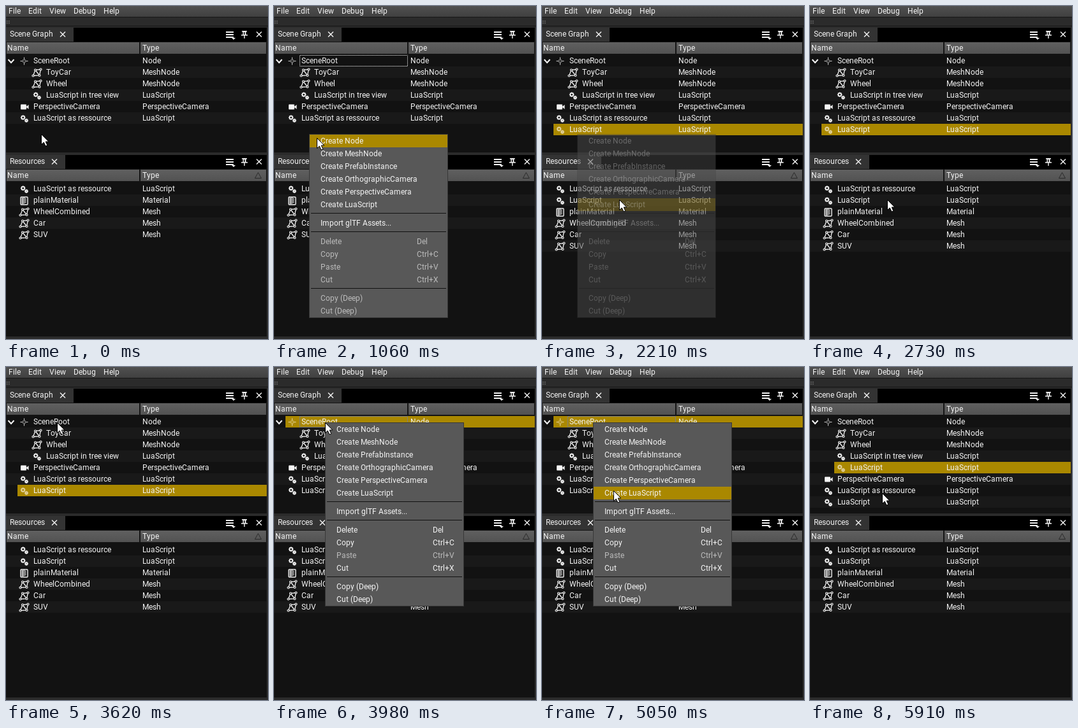
An HTML page with a canvas that plays this animation: 411 px wide and 523 px high, repeating every 6.67 s.

```html
<!DOCTYPE html>
<html lang="en">
<head>
<meta charset="utf-8">
<title>Scene editor</title>
<style>
html, body { margin: 0; width: 100%; height: 100%; overflow: hidden; background: #121212; }
canvas { display: block; }
</style>
</head>
<body>
<canvas id="stage" width="411" height="523"></canvas>
<script>
const ctx = document.getElementById('stage').getContext('2d');
const LOOP = 6670;
const GOLD = '#aa8800';
const WHITE = '#f4f4f4';
const TAN = '#e3d3a0';

function box(x, y, w, h, color) {
  ctx.fillStyle = color;
  ctx.fillRect(x, y, w, h);
}

function shade(x, y, w, h, top, bottom) {
  const g = ctx.createLinearGradient(0, y, 0, y + h);
  g.addColorStop(0, top);
  g.addColorStop(1, bottom);
  box(x, y, w, h, g);
}

// Glyphs sit on whole pixels, as in a hinted desktop interface.
function label(text, x, middle, color = WHITE) {
  ctx.font = '12px Roboto, sans-serif';
  ctx.fillStyle = color;
  for (const glyph of text) {
    ctx.fillText(glyph, x, middle + 4);
    x += Math.round(ctx.measureText(glyph).width);
  }
}

function trace(points, closed) {
  ctx.beginPath();
  points.forEach(([x, y]) => ctx.lineTo(x, y));
  if (closed) ctx.closePath();
}

function line(points, color, width = 1, closed = false) {
  trace(points, closed);
  ctx.strokeStyle = color;
  ctx.lineWidth = width;
  ctx.stroke();
}

function fillShape(points, color) {
  trace(points, true);
  ctx.fillStyle = color;
  ctx.fill();
}

function ring(x, y, r, color, width) {
  ctx.beginPath();
  ctx.arc(x, y, r, 0, Math.PI * 2);
  ctx.strokeStyle = color;
  ctx.lineWidth = width;
  ctx.stroke();
}

function at(x, y, draw) {
  ctx.save();
  ctx.translate(x, y);
  draw();
  ctx.restore();
}

function gear(x, y, r, color) {
  ring(x, y, r, color, 1.7);
  for (let i = 0; i < 8; i++) {
    const c = Math.cos(i * Math.PI / 4), s = Math.sin(i * Math.PI / 4);
    line([[x + c * r, y + s * r], [x + c * (r + 1.6), y + s * (r + 1.6)]], color, 1.3);
  }
}

// Icons are drawn around their own centre.
const icons = {
  node(color) {
    const c = color === WHITE ? '#c4c4c4' : color;
    for (let i = 0; i < 8; i++) {
      const a = i * Math.PI / 4, far = i % 2 ? 3.6 : 6;
      line([[Math.cos(a) * 1.4, Math.sin(a) * 1.4], [Math.cos(a) * far, Math.sin(a) * far]], c, i % 2 ? 0.8 : 1.1);
    }
  },
  mesh(color) {
    const dots = [[-6, 5], [-2.5, -4], [6, -5], [4, 4.5]];
    line(dots, color, 1.3, true);
    line([dots[1], dots[3]], color, 1.3);
    for (const [x, y] of dots) {
      ctx.beginPath();
      ctx.arc(x, y, 1.5, 0, Math.PI * 2);
      ctx.fillStyle = '#161616';
      ctx.fill();
      ring(x, y, 1.5, color, 1.2);
    }
  },
  script(color) {
    gear(-1.8, -1.3, 2.3, color);
    gear(3.5, 3.3, 1.5, color);
  },
  camera(color) {
    ctx.beginPath();
    ctx.roundRect(-5.5, -4, 9, 8, 1);
    ctx.fillStyle = color;
    ctx.fill();
    fillShape([[3, 0], [7, -3.5], [7, 3.5]], color);
  },
  material(color) {
    ctx.beginPath();
    ctx.roundRect(-5.5, -5.5, 11, 12, 1);
    ctx.strokeStyle = color;
    ctx.lineWidth = 1.4;
    ctx.stroke();
    box(-4, -5, 3, 11, '#b8b8b8');
    for (let i = 0; i < 9; i++) box(-1 + (i % 2) * 2, -4.5 + i, 2, 1, color);
  }
};

const row = (name, type, icon, level = 0) => ({ name, type, icon, level });
const shared = row('LuaScript as ressource', 'LuaScript', 'script');
const fresh = row('LuaScript', 'LuaScript', 'script');
const child = row('LuaScript', 'LuaScript', 'script', 1);
const root = row('SceneRoot', 'Node', 'node');
const branch = [
  root,
  row('ToyCar', 'MeshNode', 'mesh', 1),
  row('Wheel', 'MeshNode', 'mesh', 1),
  row('LuaScript in tree view', 'LuaScript', 'script', 1)
];
const camera = row('PerspectiveCamera', 'PerspectiveCamera', 'camera');
const assets = [
  row('plainMaterial', 'Material', 'material'),
  ...['WheelCombined', 'Car', 'SUV'].map(n => row(n, 'Mesh', 'mesh'))
];

function focusFrame(y, color) {
  ctx.setLineDash([1, 1]);
  ctx.lineDashOffset = -0.5;
  line([[40.5, y + 0.5], [209.5, y + 0.5], [209.5, y + 17.5], [40.5, y + 17.5]], color, 1, true);
  ctx.setLineDash([]);
}

function rowsView(rows, top, selected, focused) {
  rows.forEach((r, i) => {
    const y = top + i * 18, indent = r.level * 20;
    const active = r === selected;
    box(0, y, 409, 18, i % 2 ? '#191919' : '#121212');
    if (active) box(18 + indent, y, 391, 18, GOLD);
    at(28.5 + indent, y + 9.5, () => icons[r.icon](active ? TAN : WHITE));
    label(r.name, 43 + indent, y + 9);
    label(r.type, 214, y + 9);
    if (r === focused) focusFrame(y, active ? '#5577ff' : '#fff');
  });
  box(409, top, 2, rows.length * 18, '#2b2b2b');
}

function cross(x, y) {
  line([[x - 4, y - 4], [x + 4, y + 4]], WHITE, 1.4);
  line([[x + 4, y - 4], [x - 4, y + 4]], WHITE, 1.4);
}

function headerCell(text, x, y, w, textX) {
  box(x, y, w, 20, '#141414');
  shade(x + 1, y + 1, w - 2, 18, '#606060', '#525252');
  label(text, textX, y + 10);
}

function panel(title, top, tabWidth, closeX) {
  box(0, top, 409, 22, '#000');
  box(0, top, tabWidth, 22, '#333');
  label(title, 6, top + 10);
  cross(closeX, top + 10.5);
  for (let i = 0; i < 3; i++) box(345, top + 6 + i * 4, 12, 2, WHITE);
  fillShape([[354, top + 16], [360, top + 16], [357, top + 19]], WHITE);
  box(370, top + 5, 8, 1.5, WHITE);
  box(371.5, top + 6, 5, 5, WHITE);
  box(373, top + 7, 1.5, 4, '#000');
  box(369, top + 11, 10, 1.5, WHITE);
  box(373.3, top + 12, 1.4, 5, WHITE);
  cross(397, top + 10.5);
  headerCell('Name', 0, top + 22, 210, 2);
  headerCell('Type', 210, top + 22, 199, 214);
}

const ITEMS = [
  ...['Node', 'MeshNode', 'PrefabInstance', 'OrthographicCamera', 'PerspectiveCamera', 'LuaScript']
    .map((n, i) => ['Create ' + n, 11 + i * 20]),
  ['Import glTF Assets...', 140],
  ['Delete', 169, 'Del'], ['Copy', 189, 'Ctrl+C'], ['Paste', 209, 'Ctrl+V'], ['Cut', 229, 'Ctrl+X'],
  ['Copy (Deep)', 258], ['Cut (Deep)', 278]
];

function contextMenu(x, y, alpha, mouse, disabled) {
  ctx.globalAlpha = alpha;
  box(x, y, 218, 289, '#383838');
  box(x + 1, y + 1, 216, 287, '#585858');
  const inside = mouse.x > x + 1 && mouse.y > y;
  ITEMS.forEach(([text, mid, keys]) => {
    if (inside && Math.abs(mouse.y - y - mid) <= 10) box(x + 1, y + mid - 10, 216, 20, GOLD);
    const color = disabled.test(text) ? '#bcbcbc' : WHITE;
    label(text, x + 18, y + mid, color);
    if (keys) label(keys, x + 169, y + mid, color);
  });
  for (const dy of [124, 153, 242]) box(x + 3, y + dy, 212, 1, '#111');
  ctx.globalAlpha = 1;
}

function pointer({ x, y }) {
  at(x + 0.5, y + 0.5, () => {
    const arrow = [[0, 0], [0, 16], [3.8, 12.6], [6.5, 18.5], [9.3, 17.3], [6.7, 11.5], [11.3, 11.5]];
    fillShape(arrow, '#fff');
    line(arrow, '#000', 1, true);
  });
}

const linear = u => u;
const MOVES = [
  [0, 0, 55, 201, 55, 201],
  [1060, 1720, 67, 207, 121, 303, u => 1 - (1 - u) ** 1.6],
  [1850, 1900, 121, 303, 121, 304],
  [2730, 3390, 121, 304, 80, 101, u => u * u * (2 - u)],
  [3440, 3530, 80, 92, 80, 76],
  [3580, 3620, 80, 80, 80, 87],
  [4410, 4540, 84, 93, 98, 113],
  [4590, 4870, 100, 123, 110, 190],
  [5020, 5050, 112, 194, 113, 198]
];

function mouseAt(t) {
  const [start, end, x0, y0, x1, y1, ease = linear] = MOVES.findLast(m => m[0] <= t);
  const stepped = Math.floor((t - start + 10) / 46.5) * 46.5;
  const u = end > start ? ease(Math.min(1, stepped / (end - start))) : 1;
  return { x: Math.round(x0 + (x1 - x0) * u), y: Math.round(y0 + (y1 - y0) * u) };
}

// Value of the last [time, value] pair reached.
const stepAt = (t, steps) => (steps.findLast(s => s[0] <= t) || [0, 0])[1];
const FADE_A = [[450, 0.2], [500, 0.5], [550, 0.8], [600, 1], [2130, 0.6], [2200, 0.3], [2270, 0]];
const FADE_B = [[3800, 0.25], [3850, 0.5], [3930, 0.8], [3980, 1], [5850, 0.5], [5910, 0]];

function draw(t) {
  const created = t >= 2130, nested = t >= 5850, onRoot = t >= 3750 && !nested;
  const mouse = mouseAt(t);

  box(0, 0, 411, 523, '#2b2b2b');
  shade(0, 0, 411, 17, '#505050', '#404040');
  [['File', 4], ['Edit', 35], ['View', 68], ['Debug', 106], ['Help', 153]]
    .forEach(([text, x]) => label(text, x, 8));
  box(0, 17, 411, 1, '#161616');
  box(0, 31, 411, 1, '#161616');
  for (let i = 0; i < 4; i++) box(1 + (i % 2) * 3, 23 + (i >> 1) * 3, 1.5, 1.5, '#777');

  box(0, 76, 409, 154, '#121212');
  box(0, 276, 409, 243, '#121212');
  panel('Scene Graph', 34, 106, 89);
  panel('Resources', 234, 93, 76);
  line([[390.5, 270.5], [395.5, 261.5], [400.5, 270.5]], '#2a2a2a', 1, true);

  const tree = [...branch, ...(nested ? [child] : []), camera, shared, ...(created ? [fresh] : [])];
  const selected = nested ? child : onRoot ? root : created ? fresh : null;
  const focused = onRoot || (t >= 450 && !created) ? root : null;
  rowsView(tree, 77, selected, focused);
  line([[3.5, 84], [8, 89], [12.5, 84]], WHITE, 2);
  rowsView([shared, ...(created ? [fresh] : []), ...assets], 278);

  const alphaA = stepAt(t, FADE_A), alphaB = stepAt(t, FADE_B);
  if (alphaA) contextMenu(55, 201, alphaA, mouse, /Delete|Copy|Paste|Cut/);
  if (alphaB) contextMenu(80, 87, alphaB, mouse, /Paste/);
  pointer(mouse);
}

const began = performance.now();
function tick() {
  draw((performance.now() - began) % LOOP);
  requestAnimationFrame(tick);
}
tick();
</script>
</body>
</html>
```
